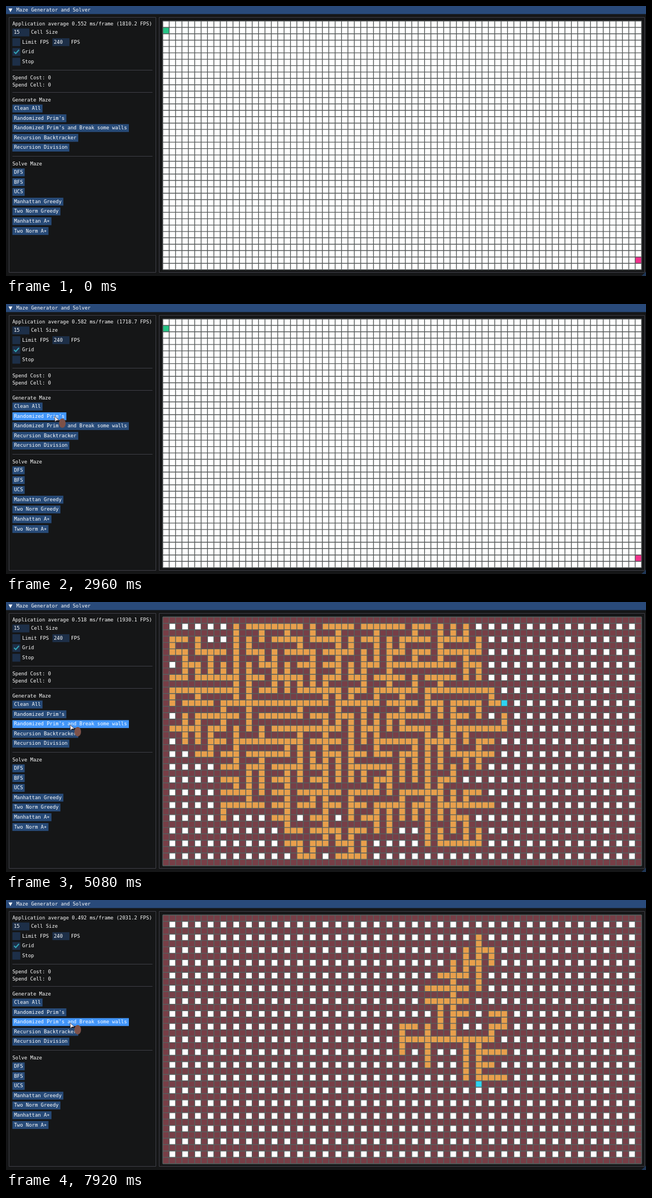
Write an HTML page with a canvas that moves like this. It is 1151 px wide and 486 px high and loops after 8000 ms.

```html
<!DOCTYPE html>
<html lang="en">
<head>
<meta charset="utf-8">
<title>Maze Generator and Solver</title>
<style>
  html, body { margin: 0; width: 100%; height: 100%; overflow: hidden; background: #151617; }
  canvas { display: block; }
</style>
</head>
<body>
<canvas id="stage" width="1151" height="486"></canvas>
<script>
const ctx = document.getElementById('stage').getContext('2d');
const LOOP = 8000, START_A = 3430, START_B = 7655;
const COLS = 75, ROWS = 39, CELL = 11.48, GX = 282, GY = 27;
const LEFT = 11.5, CHAR = 5.355, ROW = 17.6, BOX = 14.2;
const COLOR = {
  bg: '#151617', title: '#294a7a', border: '#3f3f47', frame: '#1d2f48', grip: '#1f3656',
  button: '#274a77', hover: '#4296fa', press: '#0f87fa', check: '#33a3b5',
  line: '#555959', wallLine: '#55605f', empty: '#ffffff', wall: '#773f47',
  path: '#e89f4c', head: '#2ed3f0', begin: '#26c485', end: '#f2308b'
};

function rng(seed) {
  return () => {
    seed = (seed + 0x6d2b79f5) | 0;
    let x = Math.imul(seed ^ (seed >>> 15), 1 | seed);
    x = (x + Math.imul(x ^ (x >>> 7), 61 | x)) ^ x;
    return ((x ^ (x >>> 14)) >>> 0) / 4294967296;
  };
}

// Randomized Prim's: every cell in the order it is carved.
function prim(seed, col, row) {
  const rand = rng(seed), seen = new Set(), order = [], frontier = [];

  function visit(c, r) {
    seen.add(r * COLS + c);
    order.push([c, r]);
    for (const [dc, dr] of [[1, 0], [-1, 0], [0, 1], [0, -1]]) {
      const x = c + 2 * dc, y = r + 2 * dr;
      if (x > 0 && y > 0 && x < COLS && y < ROWS) frontier.push([c + dc, r + dr, x, y]);
    }
  }

  visit(col, row);
  while (frontier.length) {
    const i = Math.floor(rand() * frontier.length);
    const [wc, wr, c, r] = frontier[i];
    frontier[i] = frontier[frontier.length - 1];
    frontier.pop();
    if (seen.has(r * COLS + c)) continue;
    order.push([wc, wr]);
    visit(c, r);
  }
  return order;
}

const mazeA = prim(11, 27, 11);
const mazeB = prim(5, 45, 13);

// Cells carved after ms; the carving speeds up slightly.
const carved = ms => Math.round(0.4 * ms + 0.00005 * ms * ms);

// Key points: time, then values.
const fpsKeys = [[20, 1810.2], [1940, 1736.7], [3460, 1709.9], [4500, 2126.4],
  [5080, 1929.9], [6040, 2104.8], [7920, 2031.2]];
const mouseKeys = [[20, 992, 476], [920, 848, 443], [1720, 130, 236], [1940, 92, 202],
  [3460, 85, 202], [4500, 109, 219], [5080, 115, 221]];

function along(keys, t) {
  const n = keys.findIndex(k => k[0] > t);
  if (n <= 0) return keys[n < 0 ? keys.length - 1 : 0].slice(1);
  const a = keys[n - 1], b = keys[n];
  const f = (t - a[0]) / (b[0] - a[0]);
  return a.slice(1).map((v, i) => v + (b[i + 1] - v) * f);
}

function rect(x, y, w, h, color) {
  ctx.fillStyle = color;
  ctx.fillRect(x, y, w, h);
}
function text(s, x, y) {
  ctx.fillStyle = '#fff';
  ctx.fillText(s, x, y);
}
function stroke(color, width) {
  ctx.strokeStyle = color;
  ctx.lineWidth = width;
  ctx.stroke();
}
function trace(...points) {
  ctx.beginPath();
  for (const [x, y] of points) ctx.lineTo(x, y);
}
function fill(color) {
  ctx.closePath();
  ctx.fillStyle = color;
  ctx.fill();
}
function cell(c, r, color) {
  rect(GX + c * CELL, GY + r * CELL, CELL, CELL, color);
}

function drawLines(color) {
  const right = GX + COLS * CELL, bottom = GY + ROWS * CELL;
  ctx.beginPath();
  for (let x = GX, c = 0; c <= COLS; c++, x += CELL) {
    ctx.moveTo(x, GY);
    ctx.lineTo(x, bottom);
  }
  for (let y = GY, r = 0; r <= ROWS; r++, y += CELL) {
    ctx.moveTo(GX, y);
    ctx.lineTo(right, y);
  }
  stroke(color, 1.4);
}

function drawMaze(t) {
  const blank = t < START_A, second = t >= START_B;
  const maze = second ? mazeB : mazeA;
  const n = carved(t - (second ? START_B : START_A));
  const done = !blank && n >= maze.length;

  rect(GX, GY, COLS * CELL, ROWS * CELL, blank ? COLOR.empty : COLOR.wall);
  if (!blank) {
    for (let r = 1; r < ROWS; r += 2) {
      for (let c = 1; c < COLS; c += 2) cell(c, r, COLOR.empty);
    }
    maze.slice(0, n).forEach(([c, r], i) => {
      cell(c, r, done ? COLOR.empty : i === n - 1 ? COLOR.head : COLOR.path);
    });
  }
  if (blank || done) {
    cell(0, 1, COLOR.begin);
    cell(COLS - 1, ROWS - 2, COLOR.end);
  }
  drawLines(blank ? COLOR.line : COLOR.wallLine);
}

function drawButtons(labels, top, mx, my, pressed) {
  labels.forEach((label, i) => {
    const y = top + i * ROW, w = label.length * CHAR + 6;
    const over = mx >= LEFT && mx < LEFT + w && my >= y && my < y + BOX;
    rect(LEFT, y, w, BOX, over ? (pressed ? COLOR.press : COLOR.hover) : COLOR.button);
    text(label, LEFT + 3, y + 7.3);
  });
}

function drawField(value, x, y) {
  rect(x, y, 30.5, BOX, COLOR.frame);
  text(value, x + 2.5, y + 7.3);
}

function drawPanel(t, mx, my) {
  const [fps] = along(fpsKeys, t);
  text(`Application average ${(1000 / fps).toFixed(3)} ms/frame (${fps.toFixed(1)} FPS)`, LEFT, 32.3);
  drawField('15', LEFT, 40.5);
  text('Cell Size', 45, 47.8);
  ['Limit FPS', 'Grid', 'Stop'].forEach((label, i) => {
    const y = 58 + i * ROW;
    rect(LEFT, y, BOX, BOX, COLOR.frame);
    text(label, 29, y + 7.3);
  });
  drawField('240', 83.5, 58);
  text('FPS', 117, 65.3);
  trace([14.5, 82.5], [17.5, 85.5], [23.3, 79]);
  stroke(COLOR.check, 2);

  for (const y of [115, 155, 270]) rect(LEFT, y, 252, 1, COLOR.border);
  text('Spend Cost: 0', LEFT, 129.5);
  text('Spend Cell: 0', LEFT, 142.7);

  const pressed = [START_A, START_B].some(start => t < start && t > start - 60);
  text('Generate Maze', LEFT, 169.5);
  drawButtons(['Clean All', "Randomized Prim's", "Randomized Prim's and Break some walls",
    'Recursion Backtracker', 'Recursion Division'], 177.4, mx, my, pressed);
  text('Solve Maze', LEFT, 284.2);
  drawButtons(['DFS', 'BFS', 'UCS', 'Manhattan Greedy', 'Two Norm Greedy',
    'Manhattan A\u2217', 'Two Norm A\u2217'], 292.3, mx, my, pressed);
}

function drawWindow() {
  rect(0, 0, 1151, 486, COLOR.bg);
  rect(0, 0, 1151, 14.5, COLOR.title);
  trace([4.5, 4.5], [11.5, 4.5], [8, 11]);
  fill('#fff');
  text('Maze Generator and Solver', 18.5, 7.8);
  for (const [x, w] of [[5.5, 264], [275.5, 873]]) {
    ctx.beginPath();
    ctx.rect(x, 20.5, w, 459);
    stroke(COLOR.border, 1);
  }
  trace([1151, 478], [1151, 486], [1143, 486]);
  fill(COLOR.grip);
}

function drawCursor(x, y) {
  trace([x, y], [x + 1, y + 10], [x + 3.5, y + 7.5], [x + 8, y + 7]);
  fill('#f0eeee');
  stroke('#4a3a48', 0.8);
  ctx.beginPath();
  ctx.ellipse(x + 14, y + 12.5, 6, 8.5, 0, 0, Math.PI * 2);
  fill('#7d5148');
}

function draw(t) {
  const [mx, my] = along(mouseKeys, t);
  ctx.font = '8.9px "DejaVu Sans Mono", "Liberation Mono", monospace';
  ctx.textBaseline = 'middle';
  drawWindow();
  drawPanel(t, mx, my);
  drawMaze(t);
  if (t >= 20) drawCursor(mx, my);
}

function tick() {
  draw(performance.now() % LOOP);
  requestAnimationFrame(tick);
}
tick();
</script>
</body>
</html>
```
